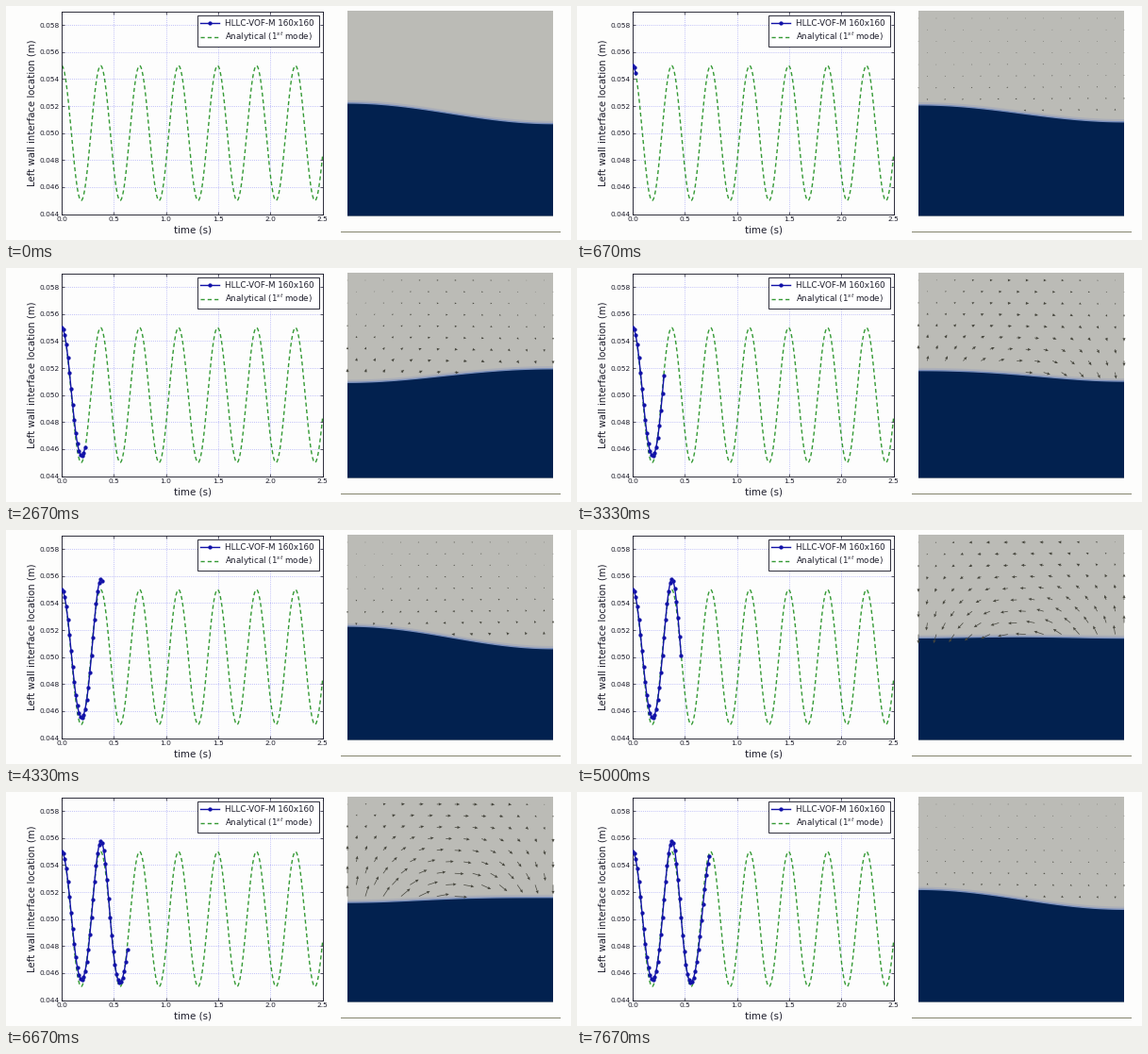
A matplotlib script that plays this animation: 599 by 248 pixels, repeating every 8 s.

```python
import numpy as np
import matplotlib.pyplot as plt
from matplotlib.animation import FuncAnimation
from matplotlib.lines import Line2D
from matplotlib.patches import Rectangle

WIDTH, HEIGHT, DPI = 599, 248, 100
LOOP_MS, POSES, HOLD = 8000, 24, 6   # each pose is held for HOLD frames
FRAMES = POSES * HOLD
STEP = 0.015            # seconds between computed samples
PERIOD = 0.3735         # analytical first mode
INK, BLUE, GREEN = "#1c1c2a", "#1212a8", "#359a35"
GAS, LIQUID, SURFACE = "#bbbbb6", "#02214f", "#7b90bd"
TURN_TIMES = np.array([0, 0.192, 0.377, 0.557, 0.753])
TURN_LEVELS = np.array([0.055, 0.0455, 0.0558, 0.0453, 0.0549])

plt.rcParams["font.family"] = "DejaVu Sans"


def pt(pixels):
    return pixels * 72 / DPI


def pixel_axes(left, top, right, bottom):
    return fig.add_axes([left / WIDTH, 1 - bottom / HEIGHT,
                         (right - left) / WIDTH, (bottom - top) / HEIGHT])


def wave(t):
    """Wall level without bend, second-mode bend and signed speed."""
    t = np.asarray(t, float)
    i = np.clip(np.searchsorted(TURN_TIMES, t, "right") - 1, 0, len(TURN_TIMES) - 2)
    start, end = TURN_LEVELS[i], TURN_LEVELS[i + 1]
    phase = np.pi * (t - TURN_TIMES[i]) / (TURN_TIMES[i + 1] - TURN_TIMES[i])
    level = (start + end) / 2 + (start - end) / 2 * np.cos(phase)
    bend = -0.0006 * np.minimum(1, 4 * t) * np.sin(phase) ** 2
    speed = np.sign(end - start) * np.sin(phase) * (0.25 + 1.4 * t)
    return level, bend, speed


def wall_level(t):
    level, bend, _ = wave(t)
    return level + bend


def surface(x, level, bend):
    """Interface height as a fraction of the tank, x in 0..1."""
    return 10 * (0.05 + (level - 0.05) * np.cos(np.pi * x)
                 + bend / 2 * np.cos(2 * np.pi * x))


fig = plt.figure(figsize=(WIDTH / DPI, HEIGHT / DPI), dpi=DPI, facecolor="#fdfdfc")

# Labels, legend and the rule under the tank share a pixel-sized layer
page = pixel_axes(0, 0, WIDTH, HEIGHT)
page.set(xlim=(0, WIDTH), ylim=(HEIGHT, 0), zorder=2)
page.axis("off")
page.plot([355, 587], [238.5, 238.5], color="#84846e", linewidth=pt(1))

# Wall level chart
chart = pixel_axes(59, 6, 335.5, 220.5)
chart.set(xlim=(0, 2.5), ylim=(0.044, 0.059), facecolor="#fdfdfd")
chart.set_xticks(np.arange(0, 2.6, 0.5))
chart.set_yticks(np.arange(0.044, 0.0581, 0.002))
chart.xaxis.set_major_formatter("{x:.1f}")
chart.yaxis.set_major_formatter("{x:.3f}")
chart.tick_params(direction="in", top=True, right=True, length=pt(3), width=pt(0.7),
                  pad=pt(2.5), labelsize=pt(7.5), color=INK, labelcolor=INK)
chart.grid(color="#8c8cf4", linewidth=pt(0.7), linestyle=(0, (1, 2)))
chart.set_axisbelow(True)
for spine in chart.spines.values():
    spine.set(color=INK, linewidth=pt(0.9))
page.text(198, 238, "time (s)", size=pt(10.2), color=INK, ha="center", va="center")
page.text(27.5, 113, "Left wall interface location (m)", size=pt(10.1), color=INK,
          ha="center", va="center", rotation=90)

computed_style = dict(color=BLUE, linewidth=pt(1.4), marker="o",
                      markersize=pt(4.3), markeredgewidth=0)
analytic_style = dict(color=GREEN, linewidth=pt(1.4), linestyle=(0, (3, 2.2)))
times = np.linspace(0, 2.5, 600)
chart.plot(times, 0.05 + 0.005 * np.cos(2 * np.pi * times / PERIOD), **analytic_style)
computed, = chart.plot([], [], zorder=4, **computed_style)

# Legend
page.add_patch(Rectangle((203, 10), 128.5, 32.5, facecolor="white",
                         edgecolor=INK, linewidth=pt(0.9), zorder=5))
page.add_line(Line2D([206, 216, 226], [18, 18, 18], zorder=6, markevery=[1],
                     **computed_style))
page.add_line(Line2D([206, 226], [33, 33], zorder=6, **analytic_style))
for y, label in ((21.3, "HLLC-VOF-M 160x160"), (36.3, "Analytical ($1^{st}$ mode)")):
    page.text(232, y, label, size=pt(8.8), color=INK, va="baseline", zorder=6)

# Tank
TANK_W, TANK_H = 218, 217.5
tank = pixel_axes(362, 5, 362 + TANK_W, 5 + TANK_H)
tank.set(xlim=(0, TANK_W), ylim=(0, TANK_H))
tank.axis("off")
tank.add_patch(Rectangle((0, 0), TANK_W, TANK_H, color=GAS, linewidth=0))
across = np.linspace(0, 1, 80)
liquid, = tank.fill([0, 1, 1], [0, 0, 1], color=LIQUID, linewidth=0, zorder=2)
glow, = tank.plot([], [], color="#a2a8ba", linewidth=pt(3.5), alpha=0.6, zorder=1.5)
edge, = tank.plot([], [], color=SURFACE, linewidth=pt(1.4), zorder=3)

# Alternate rows of arrows are shifted by half a column
columns, rows = np.meshgrid(np.arange(12), np.arange(9))
grid_x = (columns + rows % 2 / 2) / 11.5
grid_y = 1 - (8 + 12.2 * rows) / TANK_H
arrows = tank.quiver(grid_x * TANK_W, grid_y * TANK_H, 0 * grid_x, 0 * grid_y,
                     color="#45453c", units="xy", angles="uv", scale_units="xy",
                     scale=1, width=0.7, headwidth=4.5, headlength=5,
                     headaxislength=4.5, minlength=1, zorder=4, clip_on=False)


def update(frame):
    # A pose begins with the last frame before its nominal time
    pose = min((frame + 1) // HOLD, POSES - 1)
    last = int(np.floor(2.21 * pose - 1.8))
    sample_times = STEP * np.arange(max(0, last + 1))
    computed.set_data(sample_times, wall_level(sample_times))

    level, bend, speed = wave(STEP * max(0, last + 0.5))
    heights = TANK_H * surface(across, level, bend)
    xs = across * TANK_W
    edge.set_data(xs, heights)
    glow.set_data(xs, heights + 1)
    liquid.set_xy(np.column_stack([np.r_[0, xs, TANK_W], np.r_[0, heights, 0]]))

    # Potential flow of the gas above a standing wave
    gain = 11.5 * speed / np.sinh(np.pi / 2)
    depth = np.pi * (1 - grid_y)
    u = gain * np.sin(np.pi * grid_x) * np.cosh(depth)
    v = gain * np.cos(np.pi * grid_x) * np.sinh(depth)
    hidden = (grid_y < surface(grid_x, level, bend) + 0.01) | (pose == 0)
    arrows.set_UVC(np.ma.array(u, mask=hidden), np.ma.array(v, mask=hidden))
    return computed, liquid, glow, edge, arrows


animation = FuncAnimation(fig, update, frames=FRAMES, interval=LOOP_MS / FRAMES,
                          init_func=lambda: update(0), repeat=True, repeat_delay=0)
plt.show()
```
